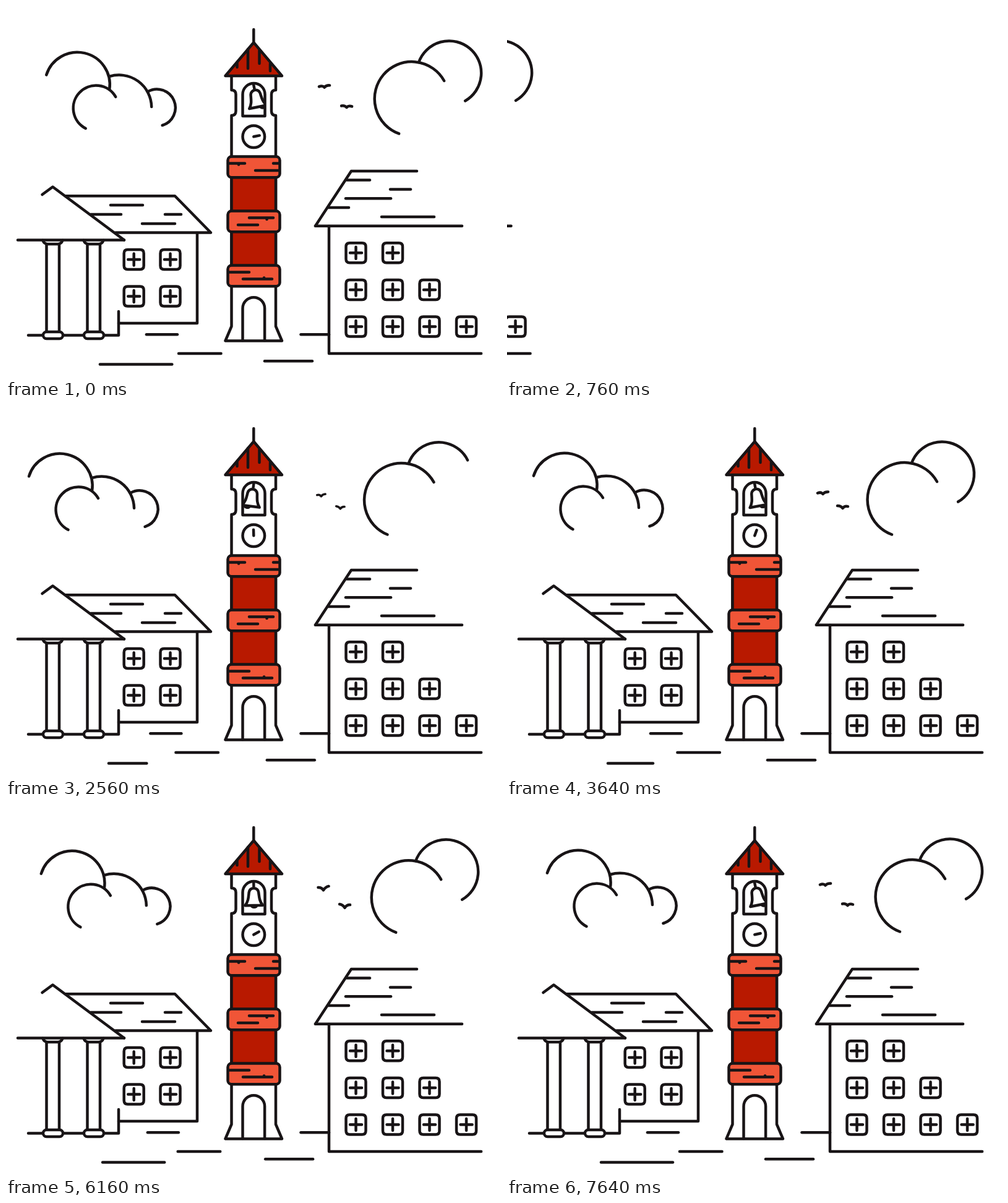
These frames come from a looping animation (800x600 px, 7680 ms). An HTML page:

```html
<!DOCTYPE html>
<html lang="en">
<head>
<meta charset="utf-8">
<title>Bell tower</title>
<style>
  html, body { margin: 0; width: 100%; height: 100%; overflow: hidden; background: #fff; }
  svg { display: block; width: 100vw; height: 100vh; }
</style>
</head>
<body>
<svg viewBox="0 0 800 600">
  <defs>
    <clipPath id="arch"><path d="M382 178V143a18 18 0 0 1 36 0V178Z"/></clipPath>
  </defs>
  <g id="scene" fill="none" stroke="#181416" stroke-width="4.5" stroke-linecap="round" stroke-linejoin="round">
    <g id="town"></g>
    <g id="ground"></g>
    <g id="cloudLeft"></g>
    <g id="cloudRight"></g>
    <g id="birds"></g>
    <g id="tower">
      <path fill="#fff" d="M364.500 113V136q7 0 7 7V170q0 7-7 7V518L354.500 541.500H446L436 518V177q-7 0-7-7V143q0-7 7-7V113"/>
      <path d="M400.300 38V58"/>
      <path fill="#b81900" d="M400.300 59L446 113H354.500Z"/>
      <path d="M391 70V101M409.500 72V93M373.500 92V99M427 93V105"/>
      <g clip-path="url(#arch)">
        <g id="bell">
          <path d="M400.300 126V135M400.300 136C396 136.500 393 139 392.500 143C391.500 151 391.500 157 386 164H414.500C409 157 409 151 408 143C407.500 139 404.500 136.500 400.300 136Z"/>
          <path id="clapper" fill="#181416" stroke-width="2" d="M395 165a5 3 0 0 0 10 0Z"/>
        </g>
      </g>
      <path d="M382.500 178V143a18 18 0 0 1 36 0V178Z"/>
      <circle cx="400.300" cy="211.300" r="17.800"/>
      <path id="hand" d="M400.300 211.300V201.700"/>
      <path fill="#b81900" d="M364.500 277H436V420H364.500Z"/>
      <g id="bands" fill="#f05537"></g>
      <path d="M403 266H441M376 256.500h.1M393 342.500H432M421.500 345h.1M375 354H407M360 430.500H393M383 441.500H430M417 439.500h.1"/>
      <path id="grain"/>
      <path d="M382.500 541V489a17.800 17.800 0 0 1 35.600 0V541"/>
    </g>
  </g>
</svg>
<script>
const LOOP = 7680, EXIT_END = 850;
const $ = id => document.getElementById(id);
const clamp = v => Math.max(0, Math.min(1, v));
const progress = (t, from, to) => clamp((t - from) / (to - from));
const smooth = p => p * p * (3 - 2 * p);
const easeOut = p => 1 - (1 - p) ** 3;
const lerp = (a, b, p) => a + (b - a) * p;

function add(parent, tag, attrs) {
  const el = document.createElementNS('http://www.w3.org/2000/svg', tag);
  for (const key in attrs) el.setAttribute(key, attrs[key]);
  return $(parent).appendChild(el);
}

const strokes = [], popups = [];

// A line that draws itself from its first point.
function stroke(parent, d, from, to, fill = 'none') {
  strokes.push({ el: add(parent, 'path', { d, fill, pathLength: 1 }), from, to });
}

function windowAt(x, y, from) {
  const d = 'M-10-16H10Q16-16 16-10V10Q16 16 10 16H-10Q-16 16-16 10V-10Q-16-16-10-16ZM-9.500 0H9.500M0-9.500V9.500';
  popups.push({ el: add('town', 'path', { d }), x, y, from });
}

// Left building with portico
stroke('town', 'M191 378.500H19', 1640, 2300);
stroke('town', 'M191 378.500L75.500 292.500L58.500 305', 1640, 2300);
stroke('town', 'M177 366.500H331L273 307.300H96', 1600, 2250);
stroke('town', 'M309 367V513H182', 1640, 2250);
stroke('town', 'M182 494V532.500H36', 1700, 2350);
for (const x of [138.500, 72.500]) {
  stroke('town', `M${x - 7} 527V385M${x + 13.500} 527V385`, 1750, 2300);
  stroke('town', `M${x - 13} 379q2 6 8 6h16q6 0 8-6`, 1750, 2250);
  stroke('town', `M${x - 7} 527h21a5.500 5.500 0 0 1 0 11h-21a5.500 5.500 0 0 1 0-11Z`, 1700, 2150, '#fff');
}
for (const [x1, x2, y] of [[169, 221, 322], [137, 186, 337], [257, 283, 337], [220, 273, 352]])
  stroke('town', `M${x2} ${y}H${x1}`, 1800, 2250);
for (let i = 0; i < 4; i++)
  windowAt(i % 2 ? 265.500 : 206.700, i < 2 ? 410 : 469.500, 1950 - i % 2 * 150);

// Right building
stroke('town', 'M500 355.700H737', 1640, 2300);
stroke('town', 'M500 355.700L558 267H664', 1640, 2300);
stroke('town', 'M522 356V562H768', 1640, 2380);
stroke('town', 'M522 531.300H476.500', 1750, 2200);
for (const [x1, x2, y] of [[551, 588, 281.500], [621, 654, 296.500], [549, 622, 311.300], [521, 554, 326], [607, 692, 341]])
  stroke('town', `M${x1} ${y}H${x2}`, 1800, 2250);
for (let row = 0; row < 3; row++)
  for (let col = 0; col < row + 2; col++)
    windowAt(565.500 + col * 59.500, 399.300 + row * 59.600, 1800 + col * 80);

// Clouds
stroke('cloudLeft', 'M177 147A36.700 36.700 0 1 0 128.500 198', 1800, 2350);
stroke('cloudLeft', 'M167 135A52.500 52.500 0 0 0 65 111.500', 1800, 2350);
stroke('cloudLeft', 'M167 114A52.500 52.500 0 0 1 235 163', 1850, 2400);
stroke('cloudLeft', 'M229 138.500A29.850 29.850 0 1 1 252.500 193', 1950, 2500);
stroke('cloudRight', 'M708 121A60 60 0 1 0 635 206.500', 2050, 2700);
stroke('cloudRight', 'M667 91A52 52 0 1 1 742 153.500', 2400, 3000);

for (const y of [243.500, 331.500, 419.500])
  add('bands', 'rect', { x: 358.500, y, width: 84, height: 33.700, rx: 6 });

// Ground lines: both ends at the end of the loop, and their speeds per second
const groundLines = [
  [152, 268, 579.500, -2.750, 8], [279, 347.500, 562, .9, .9],
  [227, 277, 531.300, -1.250, -1.250], [418, 495, 574.300, -.75, -.75]
].map(spec => ({ spec, el: add('ground', 'path', {}) }));

const birds = [
  { x: 514.500, y: 130, vx: 1, vy: -3, tilt: -.5, peak: .45 },
  { x: 550.500, y: 162.500, vx: 2, vy: -.4, tilt: 1, peak: .55 }
].map(b => ({ ...b, el: add('birds', 'path', {}) }));

// Clock hand: seconds and degrees
const handKeys = [[.8, -37], [1.6, -21], [3.64, 20], [5.12, 44], [6.16, 61], [7.64, 78], [8.6, 94]];
function handAngle(s) {
  let i = 1;
  while (i < handKeys.length - 1 && s > handKeys[i][0]) i++;
  const [t0, a0] = handKeys[i - 1], [t1, a1] = handKeys[i];
  return lerp(a0, a1, (s - t0) / (t1 - t0));
}

function move(id, x, y) {
  $(id).setAttribute('transform', `translate(${x} ${y})`);
}

function drawTower(t, leaving) {
  const fall = leaving ? 1 : progress(t, 840, 1120);
  const after = leaving ? 1 : Math.max(0, t - 1120) / 1000;
  const squash = after < .48 ? .4 * Math.sin(after / .32 * 2 * Math.PI) * Math.exp(-7 * after) : 0;
  const y = -560 * (1 - fall * fall);
  $('tower').setAttribute('transform',
    `translate(400 ${541.500 + y}) scale(${1 + squash} ${1 - squash * .5}) translate(-400 -541.500)`);
}

function draw(t) {
  const leaving = t < EXIT_END;
  const now = leaving ? t + LOOP : t;
  const sec = now / 1000, left = 7.640 - sec;
  move('scene', leaving ? -850 * smooth(t / 996) : 0, 0);
  drawTower(t, leaving);

  for (const { el, from, to } of strokes) {
    const p = easeOut(progress(now, from, to));
    el.style.display = p > 0 ? '' : 'none';
    el.setAttribute('stroke-dasharray', p < 1 ? `${p} 2` : 'none');
  }
  for (const { el, x, y, from } of popups) {
    const p = easeOut(progress(now, from, from + 300));
    el.style.display = p > 0 ? '' : 'none';
    el.setAttribute('transform', `translate(${x} ${y}) scale(${p})`);
  }

  move('cloudLeft', -5.500 * left, .75 * left);
  move('cloudRight', -3.250 * left, .75 * left);

  const grow = easeOut(progress(now, 1640, 2200));
  $('ground').style.display = grow > 0 ? '' : 'none';
  for (const { el, spec: [x1, x2, y, v1, v2] } of groundLines) {
    const a = x1 - v1 * left, b = x2 - v2 * left, mid = (a + b) / 2;
    el.setAttribute('d', `M${lerp(mid, a, grow)} ${y}H${lerp(mid, b, grow)}`);
  }

  const shown = easeOut(progress(now, 2400, 2800));
  $('birds').style.display = shown > 0 ? '' : 'none';
  for (const b of birds) {
    const flap = .5 + .5 * Math.cos(2 * Math.PI * (-left / .96 - b.peak));
    const dip = 1.500 + 3.500 * flap, rise = 2 - 2 * flap;
    const x = b.x - b.vx * left, y = b.y - b.vy * left;
    b.el.setAttribute('d', `M-8.500 ${-b.tilt}Q-3 ${-rise} 0 ${dip}Q3 ${-rise} 8.500 ${b.tilt - 1}`);
    b.el.setAttribute('transform', `translate(${x} ${y}) scale(${shown})`);
  }

  const swing = Math.cos(2 * Math.PI * (sec + .06) / 1.920);
  $('bell').setAttribute('transform', `rotate(${-11.500 * swing} 400 128)`);
  move('clapper', 8.500 * swing, 0);
  $('hand').setAttribute('transform', `rotate(${handAngle(sec)} 400.300 211.300)`);

  const grain = 14 * (1 - progress(now, 1400, 1800));
  $('grain').setAttribute('d', `M${359 + grain} 254.500H386M${Math.min(440, 432 + grain)} 254.500H441`);
}

const start = performance.now();
function tick() {
  draw((performance.now() - start) % LOOP);
  requestAnimationFrame(tick);
}
tick();
</script>
</body>
</html>
```
